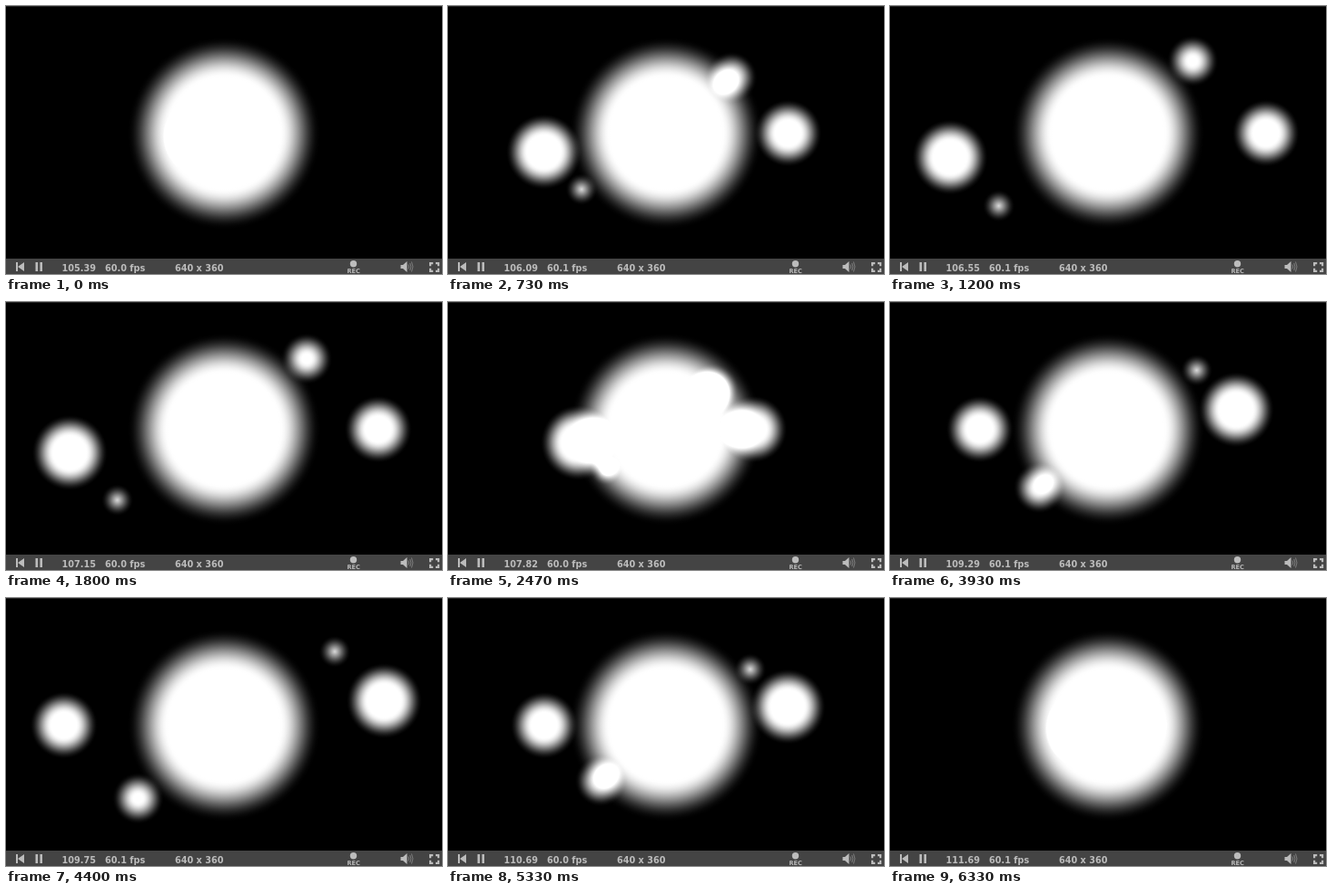
These frames come from a looping animation (480x296 px, 6.39 s). An HTML page with a canvas:

```html
<!DOCTYPE html>
<html lang="en">
<head>
<meta charset="utf-8">
<title>Orbiting glows</title>
<style>
  html, body { margin: 0; width: 480px; height: 296px; overflow: hidden; background: #000; }
  canvas, svg { position: absolute; left: 0; top: 0; display: block; }
  text { font: bold 9.7px "DejaVu Sans", Verdana, sans-serif; fill: #bcbcbc; }
  .rec { font-size: 6.6px; }
  .icon { fill: #bcbcbc; }
  .line { fill: none; stroke: #bcbcbc; }
</style>
</head>
<body>
<canvas id="stage" width="480" height="279"></canvas>
<svg width="480" height="296" viewBox="0 0 480 296">
  <rect width="480" height="1" fill="#242424"/>
  <rect y="279" width="480" height="17" fill="#444"/>
  <path class="icon" d="M11 283h2v10h-2zM20 283v10l-7-5z"/>
  <path class="icon" d="M32.5 283h2.6v10h-2.6zM37.4 283h2.6v10h-2.6z"/>
  <text id="clock" x="61.5" y="293">105.39</text>
  <text id="rate" x="109" y="293">60.0 fps</text>
  <text x="186" y="293">640 x 360</text>
  <circle class="icon" cx="382.5" cy="284.7" r="3.7"/>
  <text class="rec" x="382.6" y="295" text-anchor="middle">REC</text>
  <path class="icon" d="M434.5 286h2.5l4.5-4v12l-4.5-4h-2.5z"/>
  <path class="line" stroke-width=".8" opacity=".6" d="M443 285.5q1.4 2.5 0 5M444.8 284q2.2 4 0 8M446.5 282.5q3 5.5 0 11"/>
  <path class="line" stroke-width="2.2" d="M470.2 284.1h-3.1v3.1M473 284.1h3.1v3.1M470.2 292.9h-3.1v-3.1M473 292.9h3.1v-3.1"/>
</svg>
<script>
  const LOOP = 6390, STEP = 1000 / 15;
  const CX = 240, CY = 140.5;
  const ctx = document.getElementById('stage').getContext('2d');
  const clock = document.getElementById('clock');
  const rate = document.getElementById('rate');

  // Swing along x and y, outer radius, width of the soft edge
  const balls = [
    { dx: 0, dy: 0, r: 106, edge: 44 },
    { dx: 180, dy: 0, r: 37.5, edge: 24 },
    { dx: -180, dy: 27.5, r: 42, edge: 24 },
    { dx: 96.5, dy: -82.5, r: 28.5, edge: 24 },
    { dx: -124.5, dy: 83, r: 18, edge: 24 }
  ];

  function smooth(x) {
    x = Math.min(1, Math.max(0, x));
    return x * x * (3 - 2 * x);
  }

  function drawBall({ dx, dy, r, edge }, swing) {
    const x = CX + dx * swing, y = CY + dy * swing;
    const glow = ctx.createRadialGradient(x, y, 0, x, y, r);
    const stops = 40;
    for (let i = 0; i <= stops; i++) {
      const p = i / stops;
      glow.addColorStop(p, `rgba(255,255,255,${smooth(r * (1 - p) / edge).toFixed(4)})`);
    }
    ctx.fillStyle = glow;
    ctx.fillRect(x - r, y - r, 2 * r, 2 * r);
  }

  function render(ms) {
    const step = Math.floor((ms + 4) / STEP);
    const seconds = step / 15;
    const time = Math.max(105.39, 105.353 + seconds);
    ctx.globalCompositeOperation = 'source-over';
    ctx.fillStyle = '#000';
    ctx.fillRect(0, 0, 480, 279);
    ctx.globalCompositeOperation = 'lighter';
    for (const ball of balls) drawBall(ball, Math.cos(time));
    clock.textContent = time.toFixed(2);
    rate.textContent = `60.${'0100101'[Math.floor(seconds + 0.5)]} fps`;
  }

  const start = performance.now();
  function tick() {
    render((performance.now() - start) % LOOP);
    requestAnimationFrame(tick);
  }
  tick();
</script>
</body>
</html>
```
